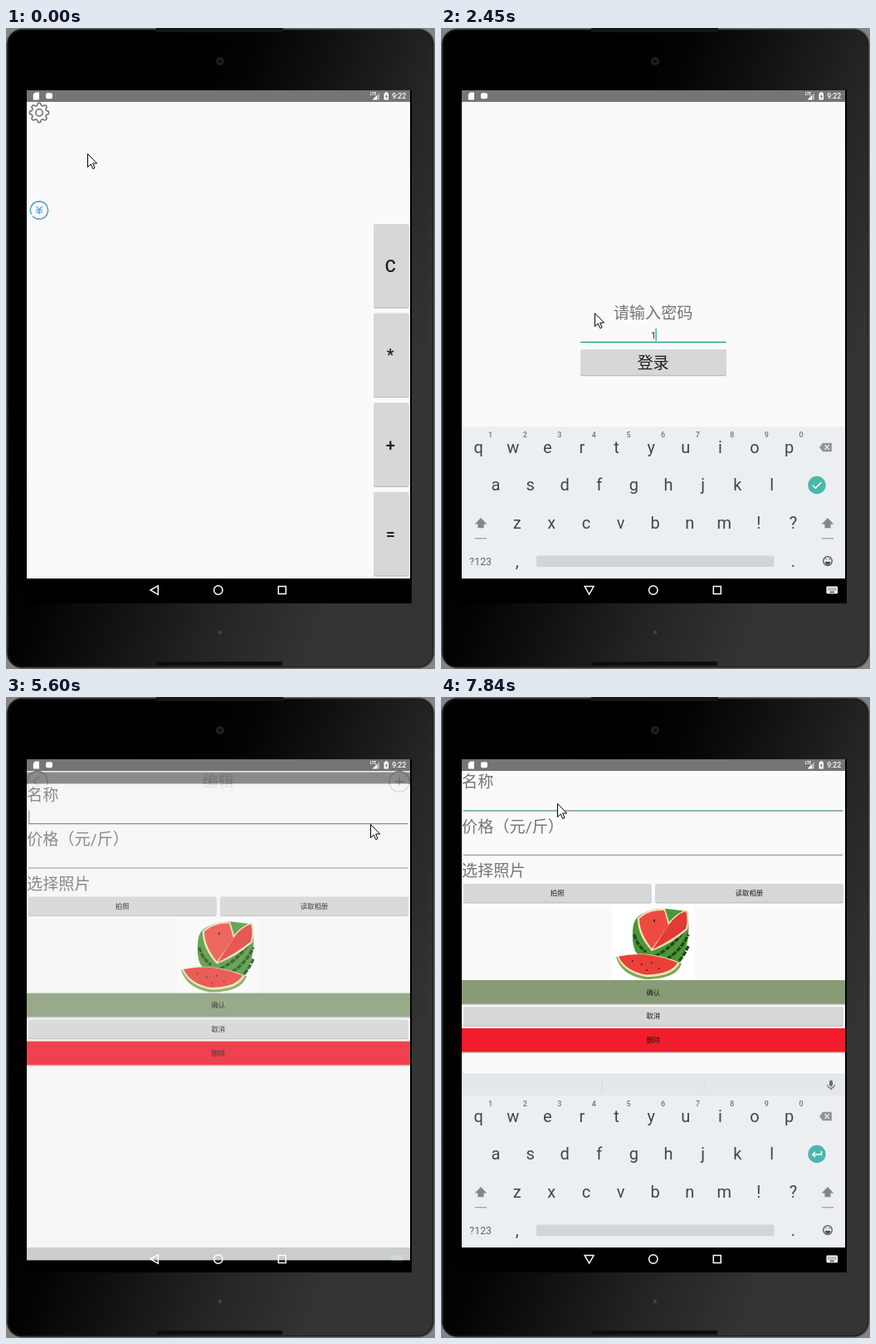
An HTML page for the animation above (8000 ms loop, 517 by 772 pixels).

```html
<!DOCTYPE html>
<html lang="zh">
<head>
<meta charset="utf-8">
<title>Tablet demo</title>
<style>
html, body { margin: 0; width: 100%; height: 100%; overflow: hidden; background: #858585; }
svg { display: block; width: 517px; height: 772px; }
text { font-family: Roboto, "Noto Sans CJK SC", "Noto Sans CJK", sans-serif; text-anchor: middle; }
.big { font-size: 19.2px; fill: #757575; }
.left { text-anchor: start; }
.small { font-size: 8.4px; fill: #1c1c1c; }
.op { font-size: 20px; font-weight: 500; fill: #202020; }
.key { font-size: 20px; fill: #3b484e; }
.num { font-size: 9px; font-weight: 500; fill: #6b757a; }
.line { fill: none; stroke: #6b6b6b; stroke-width: 1.5; }
.nav { fill: none; stroke: #fff; stroke-width: 1.5; }
</style>
</head>
<body>
<svg viewBox="0 0 517 772">
  <defs>
    <linearGradient id="shell" gradientUnits="userSpaceOnUse" x1="120" y1="150" x2="540" y2="310">
      <stop offset="0" stop-color="#000"/>
      <stop offset=".25" stop-color="#020202"/>
      <stop offset=".45" stop-color="#101010"/>
      <stop offset=".75" stop-color="#262626"/>
      <stop offset="1" stop-color="#343434"/>
    </linearGradient>
    <clipPath id="screen"><rect x="25" y="75" width="462" height="617"/></clipPath>
  </defs>
  <rect x=".7" y=".7" width="515.6" height="770.6" rx="19" fill="url(#shell)" stroke="#6a6a6c" stroke-width="1.4"/>
  <rect x="2.5" y="2.5" width="512" height="767" rx="18" fill="none" stroke="#1d1d1d"/>
  <rect x="181" y="0" width="153" height="5" fill="#161616"/>
  <rect x="181" y="763" width="152" height="5" fill="#0c0c0c" stroke="#222" stroke-width=".6"/>
  <circle cx="258" cy="40" r="5" fill="#1f1f1f"/>
  <circle cx="258" cy="40" r="2" fill="#0b0b0b"/>
  <circle cx="258" cy="728" r="2.2" fill="#454545"/>
  <rect x="25" y="75" width="464" height="618" fill="#000"/>
  <g clip-path="url(#screen)">
    <g id="home"></g>
    <g id="login"></g>
    <g id="edit"></g>
    <rect id="shade" x="25" y="89" width="462" height="574"/>
    <g id="form"></g>
    <g id="board"></g>
  </g>
  <g id="status" fill="#fff">
    <path d="M35 77.5H40V86.5H32.8V80Z"/>
    <rect x="48" y="78.3" width="8" height="7" rx="2"/>
    <text x="442.3" y="81.3" font-size="4.5" font-weight="700">LTE</text>
    <path d="M441.5 86.5L447 81V86.5Z"/>
    <path d="M447 81L450 78V86.5H447Z" opacity=".45"/>
    <path d="M455.5 78.5H457V77.3H459.7V78.5H461V86.5H455.5Z"/>
    <path d="M458.8 79.5L456.7 82.8H458.1V85.4L460 82H458.7Z" fill="#757575"/>
    <text x="473.6" y="85.2" font-size="8.6" font-weight="500">9:22</text>
  </g>
  <g class="nav">
    <path id="back"/>
    <circle cx="255.8" cy="677" r="5.2"/>
    <rect x="328.3" y="672.5" width="9" height="9"/>
  </g>
  <g id="ime"></g>
  <path id="mouse" d="M.5 .5V16.5L4.2 13L6.7 18.6L9 17.6L6.6 12H11.6Z" fill="#fff" stroke="#000" stroke-width="1"/>
</svg>
<script>
const el = id => document.getElementById(id);
const text = (cls, x, y, s) => `<text class="${cls}" x="${x}" y="${y}">${s}</text>`;
const rect = (x, y, w, h, fill, more = '') =>
  `<rect x="${x}" y="${y}" width="${w}" height="${h}" fill="${fill}" ${more}/>`;
const path = (d, more = '') => `<path d="${d}" ${more}/>`;
const button = (x, y, w, h) =>
  rect(x, y + 1.2, w, h, '#bdbdbd', 'rx="2"') + rect(x, y, w, h, '#d6d7d7', 'rx="2"');
const page = body =>
  rect(25, 75, 462, 14, '#757575') + rect(25, 89, 462, 574, '#fafafa') + rect(25, 663, 462, 30, '#000') + body;
const imeIcon = fill => rect(464.5, 672.5, 13.5, 8.8, fill, 'rx="1"') +
  path('M466.3 674.9H476.5M466.3 677H476.5', 'stroke="#000" stroke-dasharray="1.2 1"') +
  path('M468.5 679.3H474', 'stroke="#000"');

function gear(cx, cy) {
  const pts = [];
  for (let i = 0; i < 160; i++) {
    const a = i * Math.PI / 80;
    const r = 10.3 + 1.4 * Math.tanh(2.2 * Math.cos(8 * a));
    pts.push((cx + r * Math.cos(a)).toFixed(2) + ' ' + (cy + r * Math.sin(a)).toFixed(2));
  }
  return path('M' + pts.join('L') + 'Z', 'class="line"') +
    `<circle cx="${cx}" cy="${cy}" r="4.2" class="line"/>`;
}

const yen = `<g fill="none" stroke="#62a2cb" stroke-width="1.6">
  <circle cx="40" cy="219.5" r="10.6" stroke-dasharray="21 2.5 43.1 0" transform="rotate(24 40 219.5)"/>
  <path d="M36.5 214.6L40 218.8L43.5 214.6M40 218.8V224.4M36 219.2H44M36 221.8H44" stroke-width="1.3"/></g>`;

el('home').innerHTML = page(gear(40, 102) + yen +
  ['C', '*', '+', '='].map((s, i) =>
    button(443, 236 + 107.6 * i, 42.5, 100.5) + text('op', 463.3, 293.8 + 107.6 * i, s)).join(''));

el('login').innerHTML = page(
  text('big', 255.6, 350.3, '请输入密码') +
  rect(168, 377.8, 175.5, 1.3, '#1f968c') +
  '<text id="secret" x="256" y="373.8" font-size="11" fill="#333"></text>' +
  rect(255.4, 362, 1.2, 15, '#1f968c', 'id="caretA"') +
  button(168, 387, 176, 31) +
  '<text x="255.6" y="409.6" font-size="19.2" fill="#1f1f1f">登录</text>');

el('edit').innerHTML = page(
  text('big', 255.6, 109, '编辑') +
  path('M49.3 106A12.2 12.2 0 1 0 42.5 113.2M40 96L33 102L40 108', 'class="line"') +
  '<circle cx="46.2" cy="109.8" r="1" fill="#6b6b6b"/>' +
  '<circle cx="474" cy="102" r="12.2" class="line"/>' +
  path('M468.5 102H479.5M474 96.5V107.5', 'class="line" style="stroke-width:2"') +
  imeIcon('#1a6a1c'));

const melon = rect(206, 250, 100, 90, '#fff') +
  path('M231 283Q231 266 243 261Q256 254 271 255L297 258Q303 300 284 326Q246 325 234 306Q230 296 231 283Z', 'fill="#4c9636"') +
  path('M258 312Q282 300 296 276M266 319Q288 308 298 286M233 286Q236 299 247 307M282 323Q292 314 298 300',
    'fill="none" stroke="#1d4a1b" stroke-width="3.4" stroke-dasharray="6 1.5"') +
  path('M237 266Q250 254 270 255L275 271Q284 260 296 256Q300 268 297 280Q280 296 254 306Q236 286 237 266Z', 'fill="#f3e3bd"') +
  path('M239 267Q251 256 269 257L274 275Q264 290 254 303Q239 284 239 267Z', 'fill="#ee4a40"') +
  path('M274 275Q283 262 295 258Q298 268 295 279Q278 293 255 304Z', 'fill="#e23a34"') +
  path('M211 313Q250 303 290 321Q284 340 246 340Q217 335 211 313Z', 'fill="#7fa84e"') +
  path('M212 312.5Q250 304 288 320Q280 337 247 337Q220 332 212 312.5Z', 'fill="#f0e6c0"') +
  path('M214 312.5Q250 305 285 320Q277 334 247 334.5Q222 330 214 312.5Z', 'fill="#ea4038"') +
  path('M230 318h1.5M241 322h1.5M253 320h1.5M262 327h1.5M247 329h1.5M257 268v3',
    'stroke="#5a1714" stroke-width="1.8"');
const bar = (y, fill) => rect(25, y + 1.5, 462, 28.5, '#c9c9c9') + rect(25, y, 462, 28.5, fill);

el('form').innerHTML = page(
  text('big left', 25, 109.3, '名称') + rect(27, 136.4, 457, 1.2, '#4c8780') +
  rect(27.2, 121, 1.2, 15, '#6d9a94', 'id="caretB"') +
  text('big left', 25, 162.7, '价格（元/斤）') + rect(27, 189.8, 457, 1, '#858585') +
  text('big left', 25, 216, '选择照片') +
  button(27, 225, 226.5, 22.3) + text('small', 140.2, 239.3, '拍照') +
  button(258.3, 225, 226.5, 22.3) + text('small', 371.5, 239.3, '读取相册') +
  melon +
  bar(341, '#879c75') + text('small', 255.8, 358.6, '确认') +
  button(27, 373, 458, 22.5) + text('small', 255.8, 387.3, '取消') +
  bar(399, '#f11c2c') + text('small', 255.8, 416.3, '删除'));

function keys(row, x, y) {
  return [...row].map((c, i) => text('key', x + 41.6 * i, y, c)).join('');
}
const shift = x => path(`M${x} 590L${x + 7.3} 597.5H${x + 3.6}V602.3H${x - 3.6}V597.5H${x - 7.3}Z`, 'fill="#7f898d"') +
  rect(x - 7, 614.3, 14, 1, '#7f898d');

el('board').innerHTML =
  '<g id="strip">' + rect(25, 454, 462, 27, '#e4e8ea') + rect(25, 453.5, 462, 1, '#dde1e3') +
  rect(193.5, 459, 1, 17, '#d3d8da') + rect(316.5, 459, 1, 17, '#d9dee0') +
  rect(468, 461.5, 4, 7.5, '#666f73', 'rx="2"') +
  path('M465.8 467A4.2 4.2 0 0 0 474.2 467M470 471V473.5', 'fill="none" stroke="#666f73" stroke-width="1.2"') + '</g>' +
  rect(25, 480, 462, 183, '#ebeff1') +
  [...'1234567890'].map((c, i) => text('num', 59.6 + 41.6 * i, 493.2, c)).join('') +
  keys('qwertyuiop', 45.2, 511.8) + keys('asdfghjkl', 66, 557.4) + keys('zxcvbnm!?', 91.7, 603.3) +
  path('M456 505L460 499.7H470.8V510.3H460Z', 'fill="#8d9599"') +
  path('M462.5 502.3L467.9 507.7M467.9 502.3L462.5 507.7', 'stroke="#ebeff1" stroke-width="1.3"') +
  '<circle cx="453" cy="550.5" r="10.7" fill="#4db6ac"/>' +
  '<path id="action" fill="none" stroke="#fff" stroke-width="1.5"/>' +
  shift(48) + shift(466) +
  '<text x="47.7" y="646.8" font-size="12.4" fill="#5b666b">?123</text>' +
  text('key', 91.7, 648.5, ',') + text('key', 424.5, 648.5, '.') +
  rect(115, 635.5, 286.5, 13.5, '#d0d5d7', 'rx="2"') +
  '<circle cx="466" cy="642" r="5.3" fill="none" stroke="#3b484e" stroke-width="1.2"/>' +
  path('M463 643.3H469Q468 646 466 646T463 643.3M463.3 639.7h1.6M467.1 639.7h1.6', 'fill="#3b484e" stroke="#3b484e" stroke-width="1"');

el('ime').innerHTML = imeIcon('#fff');

// time, x, y
const track = [
  [280, 98, 151], [490, 80, 131], [770, 44, 97], [910, 44, 97], [1050, 72, 120], [1190, 112, 159],
  [1400, 184, 252], [1610, 213, 306], [1820, 188, 343], [2030, 188, 343], [2100, 186, 343], [2170, 185, 343],
  [3430, 185, 343], [3640, 236, 385], [3780, 257, 406], [3920, 257, 406], [4060, 255, 406],
  [4480, 255, 406], [4550, 250, 405], [4830, 360, 282], [5110, 483, 130], [5250, 474, 103],
  [5390, 474, 103], [5600, 439, 153], [5810, 416, 173], [5950, 310, 168], [6160, 155, 142],
  [6300, 146, 133], [6440, 140, 128]
];
function mouseAt(t) {
  const i = track.findIndex(p => p[0] > t);
  if (i === 0) return track[0].slice(1);
  if (i < 0) return track[track.length - 1].slice(1);
  const [a, b] = [track[i - 1], track[i]];
  const k = (t - a[0]) / (b[0] - a[0]);
  return [a[1] + (b[1] - a[1]) * k, a[2] + (b[2] - a[2]) * k];
}

const opens = { login: 950, edit: 3938, form: 5528 };
const typed = [2380, 2660, 2870, 3080, 3290, 3500];
const left = (t, start, ms) => 1 - Math.min(1, Math.max(0, (t - start) / ms));
const within = (t, ...spans) => spans.some(([a, b]) => t >= a && t < b);

function place(node, y, alpha) {
  node.setAttribute('transform', `translate(0 ${y.toFixed(2)})`);
  node.setAttribute('opacity', alpha.toFixed(3));
}
const show = (node, on) => node.setAttribute('visibility', on ? 'visible' : 'hidden');

function draw(now) {
  const t = Math.floor(now % 8000 / 70) * 70;

  for (const id in opens) {
    place(el(id), 49.4 * left(t, opens[id], 350) ** 5, 1 - left(t, opens[id], 210) ** 4);
  }
  el('shade').setAttribute('opacity', 0.09 * (1 - left(t, opens.form, 100)));

  const inForm = t >= 5622;
  const rise = left(t, inForm ? 5622 : 1123, 300);
  const stay = inForm ? 1 : left(t, 4060, 200);
  place(el('board'), 136 * rise ** 5 + 50 * (1 - stay) ** 2, (1 - rise ** 4) * stay);
  show(el('strip'), inForm);
  el('action').setAttribute('d', inForm
    ? 'M458.5 547V551H448M451 547.7L447.7 551L451 554.3'
    : 'M447.8 550.8L451.3 554.3L458.3 547.2');

  const ime = within(t, [1120, 4130], [5622, 8000]);
  el('back').setAttribute('d', ime ? 'M173.2 672.5H184L178.6 682Z' : 'M174 677L183.3 671.7V682.3Z');
  show(el('ime'), ime);

  const n = typed.filter(s => t >= s).length;
  el('secret').textContent = n ? '•'.repeat(n - 1) + n : '';
  el('caretA').setAttribute('x', 255.4 + (n ? 6.2 + 3.7 * (n - 1) : 0) / 2);
  show(el('caretA'), within(t, [980, 1470], [1960, 3990]));
  show(el('caretB'), within(t, [5390, 5950], [6440, 6930], [7350, 7840]));

  const [x, y] = mouseAt(t);
  el('mouse').setAttribute('transform', `translate(${Math.round(x)} ${Math.round(y)})`);
}

let start = null;
function tick(now) {
  if (start === null) start = now;
  draw(now - start);
  requestAnimationFrame(tick);
}
draw(0);
requestAnimationFrame(tick);
</script>
</body>
</html>
```
